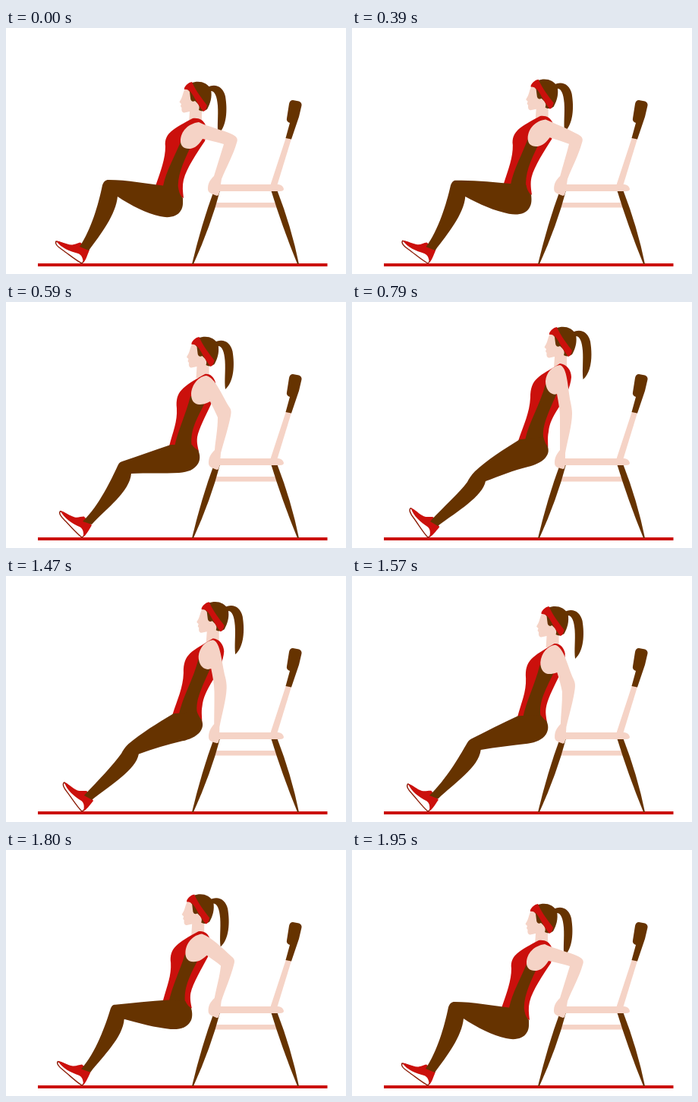
An HTML page for the animation above (2.2 s loop, 448x324 px).

```html
<!DOCTYPE html>
<html lang="en">
<head>
<meta charset="utf-8">
<title>Chair dips</title>
<style>
  html, body { margin: 0; width: 100%; height: 100%; overflow: hidden; background: #fff; }
  svg { display: block; width: 100vw; height: 100vh; }
  .red { fill: #cb100c; }
  .brown { fill: #663300; }
  .skin { fill: #f5d3c6; }
  .sole { fill: #fff; stroke: #8c1f0a; stroke-width: 1.4; }
</style>
</head>
<body>
<svg viewBox="0 0 448 324">
  <rect class="red" x="42" y="310" width="381.500" height="4"/>

  <g id="chair">
    <path class="skin" d="M276 230H355L357 236.500H274Z"/>
    <path class="brown" d="M274 214H282Q270 260 247 311H245Q258 257 274 214Z"/>
    <path class="brown" d="M349 213H357Q376 262 386 311H384Q364 262 349 213Z"/>
    <path class="skin" d="M369 144L376 146L357 208H348Z"/>
    <path class="skin" d="M279 206H359Q365 207 366 212Q366 215 361 215H279Z"/>
    <path class="brown" d="M378 95L386 96.500Q390 98 389.500 102L386 117L376 146.500L368.500 145L374 125Q369 123 370 119L373 100Q374 95 378 95Z"/>
  </g>

  <g id="head">
    <path class="brown" d="M289 41C300 34 311 39 314 52C317 70 316 92 304.500 102C303 90 305 78 304 64C303 50 299 42 291 46Z"/>
    <path class="skin" d="M261 42C258 47 258 51 256 55L253.500 59.500L256 62L255 65L256.500 67C256 71 257 73.500 260 73.500L267 72L266 87H283V60L275 40Z"/>
    <path class="brown" d="M262 40C270 30 289 30 295 43C297 53 294 62 290 69C286 72 282 72 279 70C280 67 280 65 278 62L274 58C271 60 268 58 268 54L267 46Z"/>
    <path class="red" d="M260 41C262 37 265 34 270 33C275 45 284 56 290 64C289 68 288 71 285 72L282 68C276 60 273 52 268 46Q264 42 260 43Z"/>
  </g>

  <path id="top" class="red"/>
  <path id="panel" class="brown"/>
  <path id="arm" class="skin"/>

  <g id="shoe">
    <path class="sole" d="M66 281C64 284 68 288 74 292C84 299 92 306 100 310C103 308 104 302 106 296L70 282Z"/>
    <path class="red" d="M66 280.500C73 281 79 285 86 285.500C91 285.500 94 283 98 282.500L110 292C107 300 105 306 102 309C101 303 100 299 95 297C84 294 73 290 66 280.500Z"/>
  </g>
  <path id="legs" class="brown"/>
</svg>
<script>
const LOOP = 2200, STEPS = 17, MID = 9 / STEPS;
const byId = id => document.getElementById(id);

// Each part in three poses: lowered, halfway, raised.
const shapes = {
  top: [
    'M246 119C254 118 260 121 263 128C265 135 264 142 262 149C252 164 238 184 234 200C232 208 233 216 234 224L197 208C204 188 210 172 210 156C208 138 222 132 246 119Z',
    'M262 95C269 94 274 99 276 106C277 116 273 126 270 135C263 150 254 167 252 178C251 186 253 191 254 197L215 190C220 170 226 158 225 140C223 118 232 112 262 95Z',
    'M274 81C283 82 289 90 289 99C288 112 280 128 273 138C264 152 260 160 259 171C257 180 259 188 258 196L219 183C226 162 234 146 235 126C235 100 247 98 274 81Z'
  ],
  panel: [
    'M230 150C223 168 211 188 207 208L227 214C225 196 233 178 243 157Z',
    'M243 124C237 148 226 170 222 191L245 191C242 172 249 158 262 133Z',
    'M255 108C248 135 233 158 228 182L253 182C249 166 257 150 270 120Z'
  ],
  arm: [
    'M254 124C266 130 285 134 298 140C304 143 306 146 304 151C300 166 290 184 284 199L282 212C281 218 280 221 278 221C270 218 266 217 266 212C266 204 269 200 274 195C278 182 283 166 287 153C278 150 268 148 259 146C252 157 246 159 241 159C234 159 230 155 230 149C230 136 240 126 254 124Z',
    'M264 97C276 100 284 122 294 138C297 142 297 145 296 150C293 166 287 184 283 199L282 212C281 218 280 221 278 221C270 218 267 217 267 212C267 204 270 200 275 195C276 182 279 168 279 152C276 145 273 139 269 131C263 134 260 135 254 135C247 134 244 129 244 121C245 108 254 98 264 97Z',
    'M274 83C284 86 284 112 288 132C289 137 290 142 290 147C290 162 284 182 281 199L281 211C281 217 280 220 278 220C270 218 267 217 267 212C267 204 270 200 274 195C274 182 274 166 274 152C274 142 272 132 270 121C268 122 266 122 264 121C257 118 255 110 255 104C256 93 264 84 274 83Z'
  ],
  legs: [
    'M135 200C160 200 185 205 210 208L227 210C228 218 231 222 233 224C233 228 234 236 230 241C226 248 215 251 203 248C185 244 165 234 147 222C145 245 125 272 109 293L97 288C112 266 122 232 127 207C129 202 131 200 135 200Z',
    'M153 210C175 203 195 195 217 188L245 188C248 192 251 194 253 195C256 201 256 208 253 213C248 221 240 224 228 225C208 226 185 225 165 226C163 250 132 272 113 293L101 289C123 268 139 233 147 216C149 212 150 211 153 210Z',
    'M162 223C178 208 200 194 221 181L252 178C254 184 256 188 257 189C260 195 259 200 255 205C250 211 240 215 232 217C212 222 195 229 176 236C172 256 140 275 113 295L103 289C122 268 141 252 152 237C154 233 157 228 162 223Z'
  ]
};

const parts = Object.entries(shapes).map(([id, poses]) => ({
  node: byId(id),
  commands: poses[0].match(/[A-Z]/g),
  counts: poses[0].match(/[A-Z][^A-Z]*/g).map(s => (s.match(/\d+/g) || []).length),
  values: poses.map(p => p.match(/\d+/g).map(Number))
}));

// Parabola through the three poses.
function blend(low, mid, high, q) {
  return low * (q - MID) * (q - 1) / MID
    + mid * q * (q - 1) / (MID * (MID - 1))
    + high * q * (q - MID) / (1 - MID);
}

// Height of the body, 0 lowered to 1 raised, in discrete steps.
function lift(t) {
  if (t < 390) return 0;
  if (t < 1470) return Math.min(STEPS, 1 + Math.floor((t - 390) / 25)) / STEPS;
  const down = t < 1690
    ? 1 + Math.floor((t - 1470) / 22)
    : 11 + Math.floor((t - 1690) * 6 / 260);
  return 1 - Math.min(STEPS, down) / STEPS;
}

function pose(q) {
  for (const { node, commands, counts, values: [low, mid, high] } of parts) {
    let i = 0;
    node.setAttribute('d', commands.map((c, k) => {
      const end = i + counts[k];
      let out = c;
      for (; i < end; i++) out += blend(low[i], mid[i], high[i], q).toFixed(2) + ' ';
      return out;
    }).join(''));
  }
  const x = blend(-25, -15.5, 0, q), y = blend(38, 13, 0, q);
  byId('head').setAttribute('transform', `translate(${x} ${y})`);
  byId('shoe').setAttribute('transform', `rotate(${blend(0, 10, 19, q)} 100 310)`);
}

const start = performance.now();
function tick() {
  pose(lift((performance.now() - start) % LOOP));
  requestAnimationFrame(tick);
}
tick();
</script>
</body>
</html>
```
